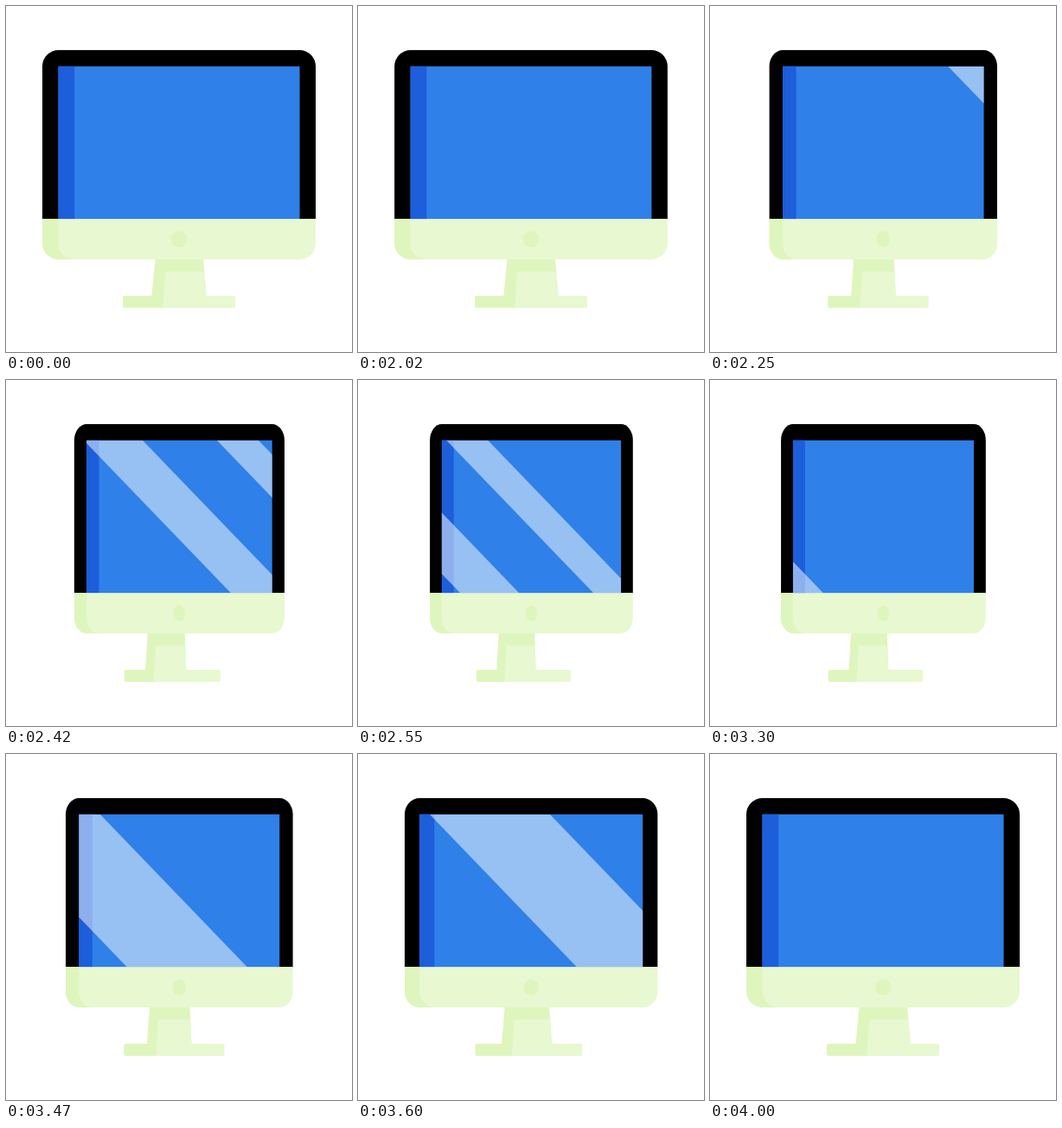
Recreate the animation shown at these times as an HTML page with a canvas. Size 400 px wide and 400 px high, loop 4020 ms.

```html
<!DOCTYPE html>
<html lang="en">
<head>
<meta charset="utf-8">
<title>Turning monitor</title>
<style>
  html, body { margin: 0; width: 100%; height: 100%; overflow: hidden; background: #fff; }
  canvas { display: block; width: 100vmin; height: 100vmin; }
</style>
</head>
<body>
<canvas width="400" height="400"></canvas>
<script>
const LOOP = 4020, TURN = 2020, BACK = 3020, END = 4000;
const BLUE = '#2f80e8', DEEP = '#1d5edb', PALE = '#e8f8d0', SHADE = '#def6bd';
const TOP = 69.7, CHIN = 246.3, FOOT = 335;
const ctx = document.querySelector('canvas').getContext('2d');
const start = performance.now();

function fill(color, trace) {
  ctx.fillStyle = color;
  ctx.beginPath();
  trace();
  ctx.fill();
}

const box = (color, x, y, w, h, r = 0) => fill(color, () => ctx.roundRect(x, y, w, h, r));

const poly = (color, ...points) => fill(color, () => {
  for (const [x, y] of points) ctx.lineTo(x, y);
});

const inOutCubic = u => u < .5 ? 4 * u ** 3 : 1 - 4 * (1 - u) ** 3;

// 0 faces the viewer, 1 is fully turned
function turnAt(t) {
  if (t < TURN || t >= END) return 0;
  if (t < BACK) return 1 - (1 - (t - TURN) / (BACK - TURN)) ** 3.5;
  return 1 - inOutCubic((t - BACK) / (END - BACK));
}

function drawStand(k) {
  const mix = (a, b) => a + (b - a) * k;
  const left = mix(135, 137), right = mix(265, 244.5);
  const neckL = mix(172.5, 162), neckR = mix(228, 202.5);
  const footL = mix(168.3, 159.5), footR = mix(231.8, 203.5);
  const litTop = mix(184.5, 170.5), litFoot = mix(181.3, 168.5);
  const litMid = litFoot + (litTop - litFoot) / 3;

  poly(SHADE, [neckL, 292], [neckR, 292], [footR, FOOT + 1], [footL, FOOT + 1]);
  box(SHADE, left, FOOT, litFoot + 4 - left, 14, [2, 0, 0, 2]);
  poly(PALE, [litTop, 307], [neckR + (footR - neckR) / 3, 307],
    [footR, FOOT + 1], [litMid, FOOT + 1]);
  fill(PALE, () => {
    ctx.moveTo(litMid, FOOT);
    ctx.arcTo(right, FOOT, right, 349, 2);
    ctx.arcTo(right, 349, litFoot, 349, 2);
    ctx.lineTo(litFoot, 349);
  });
}

// A slanted streak between two positions on the screen's lower edge
function streak(x, width) {
  poly('rgba(255,255,255,.5)', [x - 170, TOP], [x - 170 + width, TOP],
    [x + width, CHIN], [x, CHIN]);
}

function drawShine(t) {
  if (t < TURN || t >= END) return;
  if (t < BACK) {
    const x = 261 - 1.09 * (t - 2420);
    streak(x, 68);
    streak(x + 154, 48);
  } else {
    streak(-9 + .87 * (t - 3300), 139);
  }
}

function drawMonitor(t, k) {
  ctx.save();
  ctx.translate(200 + .5 * k, 0);
  ctx.scale(1 - .277 * k, 1);
  box('#000', -158, 51, 316, CHIN - 51, [18.6, 18.6, 0, 0]);
  box(BLUE, -139.5, TOP, 279, CHIN - TOP);
  box(DEEP, -139.5, TOP, 18.6, CHIN - TOP);

  box(PALE, -158, CHIN, 316, 46.7, [0, 0, 18.6, 18.6]);
  fill(SHADE, () => {
    ctx.moveTo(-158, CHIN);
    ctx.lineTo(-139.5, CHIN);
    ctx.arcTo(-139.5, 293, -121, 293, 18.5);
    ctx.arcTo(-158, 293, -158, CHIN, 18.6);
  });
  fill(SHADE, () => ctx.arc(0, 269.6, 9.4, 0, 7));

  ctx.beginPath();
  ctx.rect(-139.5, TOP, 279, CHIN - TOP);
  ctx.restore();
  ctx.save();
  ctx.clip();
  drawShine(t);
  ctx.restore();
}

function frame() {
  const t = (performance.now() - start) % LOOP;
  const k = turnAt(t);
  ctx.fillStyle = '#fff';
  ctx.fillRect(0, 0, 400, 400);
  drawStand(k);
  drawMonitor(t, k);
  requestAnimationFrame(frame);
}
frame();
</script>
</body>
</html>
```
